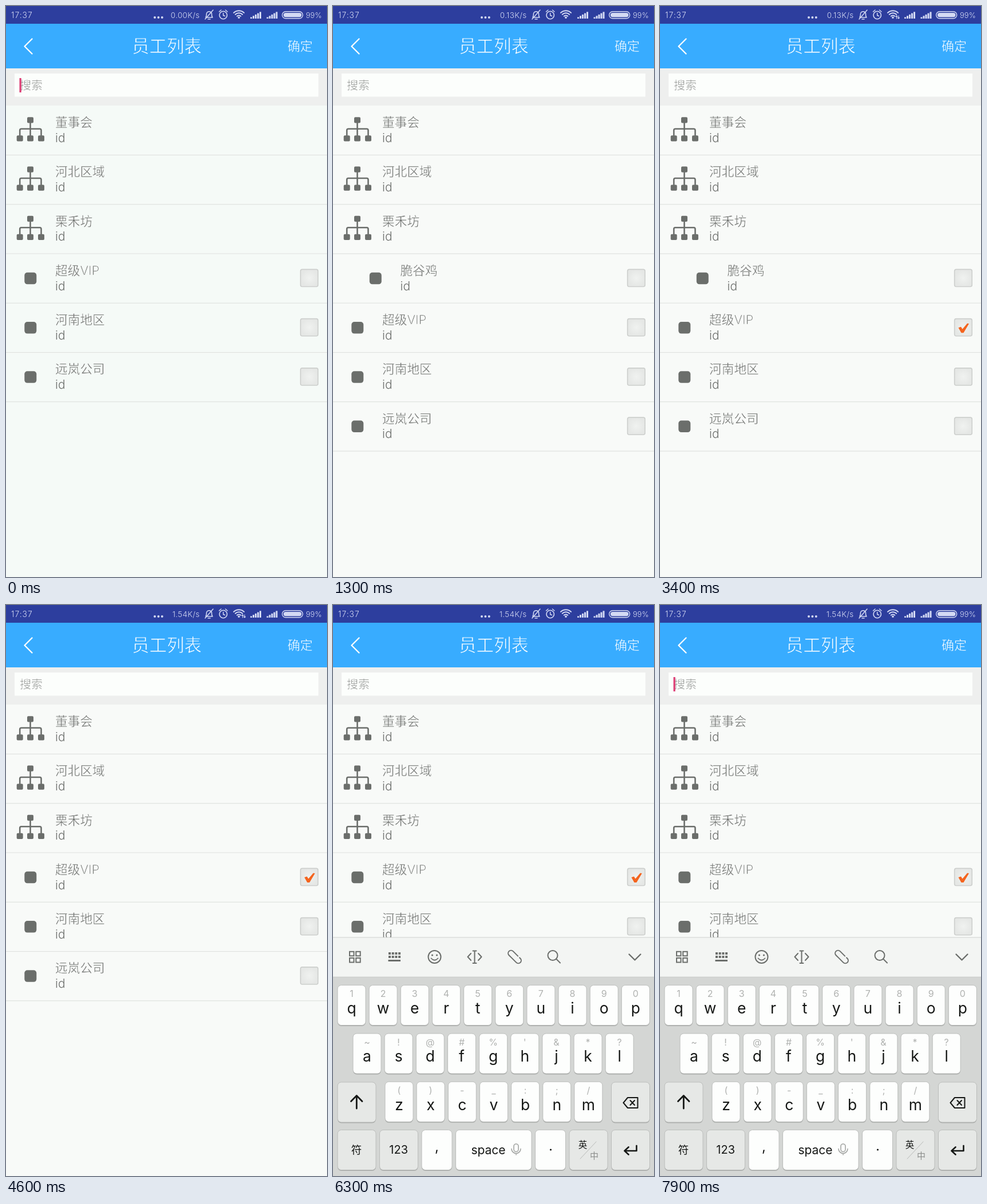
An HTML page for the animation above (8 s loop, 561 by 998 pixels).

```html
<!DOCTYPE html>
<html lang="zh">
<head>
<meta charset="utf-8">
<style>
html, body { margin: 0; height: 100%; overflow: hidden; }
svg { display: block; width: 100vw; height: 100vh; }
text { font-family: Inter, "Noto Sans CJK SC", "Noto Sans CJK", sans-serif; font-weight: 300; white-space: pre; }
#keyboard text { font-weight: 400; }
.line { fill: none; stroke-linecap: round; stroke-linejoin: round; }
</style>
</head>
<body>
<svg id="stage" viewBox="0 0 561 998" preserveAspectRatio="none"></svg>
<script>
const LOOP = 8000, ROW = 86.25, LIST_TOP = 174.3;
const GREY = '#6b6e6b', INK = '#6d6f6d', PALE = '#d4daf4', BLACK = '#151715';
const BLUE = '#38acff', PAPER = '#f8faf8', FIELD = '#fcfefc';

const text = (x, y, size, fill, str, anchor = 'start', extra = '') =>
  `<text x="${x}" y="${y}" font-size="${size}" fill="${fill}" text-anchor="${anchor}" ${extra}>${str}</text>`;
const rect = (x, y, w, h, fill, r = 0, extra = '') =>
  `<rect x="${x}" y="${y}" width="${w}" height="${h}" rx="${r}" fill="${fill}" ${extra}/>`;
const line = (d, stroke, width = 2, extra = '') =>
  `<path class="line" d="${d}" stroke="${stroke}" stroke-width="${width}" ${extra}/>`;
const circle = (x, y, r, fill, extra = '') => `<circle cx="${x}" cy="${y}" r="${r}" fill="${fill}" ${extra}/>`;
const group = (id, body) => `<g id="${id}">${body}</g>`;
const times = (n, make) => Array.from({ length: n }, (_, i) => make(i)).join('');
const outline = (color, width) => `stroke="${color}" stroke-width="${width}"`;

// A stroke in the background colour gives the light weight of the phone's typeface.
const thin = background => outline(background, 0.5);

// ---- status bar and header ----
function statusBar() {
  const signal = x => times(5, i => rect(x + i * 4, 19.5 - i * 2.3, 3, 2.5 + i * 2.3, PALE));
  const wifi = [4.5, 8.7, 12.8].map(r => {
    const k = r * 0.71;
    return line(`M${407 - k} ${21 - k}A${r} ${r} 0 0 1 ${407 + k} ${21 - k}`, PALE);
  }).join('') + circle(407, 20.3, 1.8, PALE);
  return rect(0, 0, 561, 31, '#2d3e9e')
    + text(9, 20.7, 13.8, PALE, '17:37', 'start', 'letter-spacing="1"')
    + times(3, i => circle(260 + i * 6.4, 20, 2, PALE))
    + text(338.5, 20.7, 13.5, PALE, '', 'end', 'id="speed" letter-spacing=".3"')
    + line('M349 20H361C359 18 359.5 15 359.5 13A4.7 4.7 0 0 0 350.5 13C350.5 16 350.5 18 349 20ZM353 23H357M348 23L362 7', PALE, 1.5)
    + circle(379.7, 16, 6.7, 'none', outline(PALE, 1.6))
    + line('M379.7 12.5V16.5L382.5 17.5M372.5 10L376 7M387 10L383.5 7', PALE, 1.5)
    + wifi
    + group('traffic', line('M413.5 22V17M412 18.5L413.5 17L415 18.5M417 17V22M415.5 20.5L417 22L418.5 20.5', PALE, 1.1))
    + signal(427) + signal(455.5)
    + rect(482.7, 9.7, 36, 12, 'none', 6, outline(PALE, 1.4))
    + rect(485, 12, 31.5, 7.5, PALE, 3.7)
    + text(524, 20.5, 13, PALE, '99%');
}

function header() {
  return rect(0, 31, 561, 78, BLUE)
    + line('M45.5 57.5L32.5 70.5L45.5 83.5', '#fff', 2.4)
    + text(281, 81, 30.5, '#fff', '员工列表', 'middle', outline(BLUE, 0.8))
    + text(492, 77.7, 22, '#fff', '确定', 'start', thin(BLUE))
    + rect(0, 109, 561, 65, '#eeefee') + rect(15, 118, 531, 40.5, FIELD)
    + text(24, 146, 20, '#8d8f8d', '搜索', 'start', thin(FIELD))
    + rect(23.5, 126, 3.2, 25, '#dd3c74', 0, 'id="caret"');
}

// ---- list rows ----
const orgIcon = [[37, 20], [18.7, 52], [37, 52], [56, 52]].map(([x, y]) => rect(x, y, 11, 10.3, GREY, 2)).join('')
  + line('M42.5 28V54M24.2 54V43Q24.2 40.5 26.7 40.5H59Q61.5 40.5 61.5 43V54', GREY, 2.6);

const checkBox = id => rect(514.7, 27.3, 30.6, 30.2, 'url(#boxFill)', 3, outline('#cdcfcd', 1.6))
  + (id ? `<path id="${id}" d="M521.5 43L526 41.5L528.5 45.5L537 35.5L540 36L530.5 52H526.5Z" fill="#f4641e"/>` : '');

function row(index, name, { id = '', indent = 0, box = false, check = '' } = {}) {
  const icon = box ? rect(32.3 + indent, 32.8, 21, 20.5, GREY, 5) : orgIcon;
  const body = icon + text(86 + indent, 36.8, 21.7, INK, name, 'start', thin(PAPER))
    + text(86 + indent, 63.6, 21, INK, 'id');
  return `<g transform="translate(0 ${LIST_TOP + index * ROW})">${id ? group(id, body) : body}`
    + (box ? checkBox(check) : '') + rect(0, ROW - 0.6, 561, 1.1, '#dee0de') + '</g>';
}

// ---- keyboard ----
const key = (x, y, w, special) => rect(x, y + 1.5, w, 70, '#a7a9a7', 6.5)
  + rect(x, y, w, 70, special ? '#e6e8e6' : '#fdfefd', 6.5, outline('#b8bab8', 0.9));

function toolbar() {
  return rect(0, 581, 561, 69.5, '#f3f5f3') + rect(0, 580.5, 561, 1, '#cfd1cf')
    + times(4, i => rect(29 + (i % 2) * 11.2, 605.8 + (i > 1) * 11.2, 7.5, 7.5, 'none', 0, outline(GREY, 2)))
    + times(8, i => rect(97 + (i % 4) * 5.7, 607 + (i > 3) * 6, 4, 4, GREY)) + rect(96.5, 620, 21.5, 3, GREY)
    + circle(177.5, 615, 11, 'none', outline(GREY, 2))
    + circle(173.5, 612, 1.6, GREY) + circle(181.5, 612, 1.6, GREY)
    + line('M171.5 617.5Q177.5 624 183.5 617.5', GREY, 1.8)
    + line('M241 609L235.5 615L241 621M254 609L259.5 615L254 621M247.5 605V626M244.5 604.5H250.5M244.5 626H250.5', GREY)
    + line('M3 -5H-9A5 5 0 0 0 -9 5H-3M-3 5H9A5 5 0 0 0 9 -5H7', GREY, 2, 'transform="translate(317.5 615) rotate(45)"')
    + circle(384, 612.5, 8.5, 'none', outline(GREY, 2)) + line('M390.5 619L397 625.5', GREY)
    + line('M517.5 610.5L527.5 620.5L537.5 610.5', GREY, 2.4);
}

function letterRow(x0, y, letters, hints) {
  return times(letters.length, i => {
    const x = x0 + i * 55.15, mid = x + 24.5;
    return key(x, y, 49, false) + text(mid, y + 20.5, 16, '#b0b2b0', hints[i].replace('&', '&amp;'), 'middle')
      + text(mid, y + 49.3, 26.5, BLACK, letters[i], 'middle');
  });
}

function keyboard() {
  const bottomKeys = [[8, 67, 1], [81.5, 67, 1], [155, 53, 0], [214.5, 132.5, 0], [353.5, 53, 0], [413, 67, 1], [486.5, 67, 1]];
  return toolbar() + rect(0, 650, 561, 348, '#d4d6d4') + rect(0, 649.7, 561, 1, '#c8cac8')
    + letterRow(8, 664.5, 'qwertyuiop', '1234567890')
    + letterRow(35, 749, 'asdfghjkl', "~!@#%'&*?")
    + letterRow(91, 833.3, 'zxcvbnm', '()-_:;/')
    + key(8, 834, 67, true) + key(486.5, 834, 67, true)
    + line('M41.3 880V858M31.5 867.5L41.3 857.5L51 867.5', BLACK, 2.8)
    + line('M507.5 870L515 861H532.5V879H515ZM519.5 866L527 874M527 866L519.5 874', BLACK)
    + bottomKeys.map(([x, w, special]) => key(x, 917.5, w, special)).join('')
    + text(41, 958.5, 18.5, BLACK, '符', 'middle') + text(114.7, 959, 20, BLACK, '123', 'middle')
    + text(181.5, 955, 24, BLACK, ',', 'middle') + text(271.5, 959.5, 21, BLACK, 'space', 'middle')
    + rect(316, 942, 8, 13.5, 'none', 4, outline('#a2a4a2', 1.6))
    + line('M312 950.5A8 8 0 0 0 328 950.5M320 958.5V961', '#a2a4a2', 1.6)
    + circle(380.5, 952, 1.6, BLACK)
    + text(436.5, 949, 15.5, BLACK, '英', 'middle')
    + line('M432 968L460 938', '#b8bab8', 1) + text(456.5, 968, 15, '#8b8d8b', '中', 'middle')
    + line('M530.5 945V954H510M516.5 947.5L509.5 954L516.5 960.5', BLACK, 2.6);
}

document.getElementById('stage').innerHTML =
  `<defs><radialGradient id="boxFill"><stop offset="0" stop-color="#f0f2f0"/><stop offset="1" stop-color="#e5e7e5"/></radialGradient></defs>`
  + rect(0, 0, 561, 998, PAPER, 0, 'id="page"')
  + row(0, '董事会') + row(1, '河北区域') + row(2, '栗禾坊', { id: 'parent' })
  + group('child', row(3, '脆谷鸡', { indent: 31.5, box: true, check: 'childCheck' }))
  + group('lower', rect(0, LIST_TOP + 3 * ROW + 0.6, 561, 740, PAPER, 0, 'id="cover"')
    + row(3, '超级VIP', { box: true, check: 'vipCheck' })
    + row(4, '河南地区', { box: true })
    + row(5, '远岚公司', { box: true }))
  + statusBar() + header() + group('keyboard', keyboard());

// ---- motion ----
const el = id => document.getElementById(id);
const set = (id, name, value) => el(id).setAttribute(name, value);
const show = (id, on) => set(id, 'visibility', on ? 'visible' : 'hidden');
const ramp = (t, from, to) => Math.min(1, Math.max(0, (t - from) / (to - from)));
const easeInOut = p => (1 - Math.cos(Math.PI * p)) / 2;
const caretToggles = [300, 800, 1300, 1800, 2200, 2700, 3300, 3800, 4300, 4800, 5300, 5800, 6300, 6800, 7200, 7700];

// Touch feedback: quick dim, slower recovery.
const pressed = (t, down, up) => 0.75 * (ramp(t, down, down + 100) - easeInOut(ramp(t, up, up + 250)));

function render(t) {
  const open = easeInOut(ramp(t, 802, 1102)) - easeInOut(ramp(t, 3580, 3880));
  set('lower', 'transform', `translate(0 ${open * ROW})`);
  set('child', 'opacity', ramp(open, 0.3, 1));
  set('parent', 'opacity', 1 - pressed(t, 590, 730) - pressed(t, 3510, 3610));

  show('childCheck', t >= 1900 && t < 2800);
  show('vipCheck', t >= 2800);
  show('caret', caretToggles.filter(x => x <= t).length % 2 === 0);
  show('traffic', t >= 1800 && t < 5000);
  el('speed').textContent = t < 300 ? '0.00K/s' : t < 4300 ? '0.13K/s' : '1.54K/s';

  const paper = t < 600 ? '#f5faf7' : PAPER;
  set('page', 'fill', paper);
  set('cover', 'fill', paper);

  const slide = 1 - (1 - ramp(t, 4610, 4800)) ** 2;
  set('keyboard', 'transform', `translate(0 ${(1 - slide) * 420})`);
}

function tick() {
  render(performance.now() % LOOP);
  requestAnimationFrame(tick);
}
tick();
</script>
</body>
</html>
```
